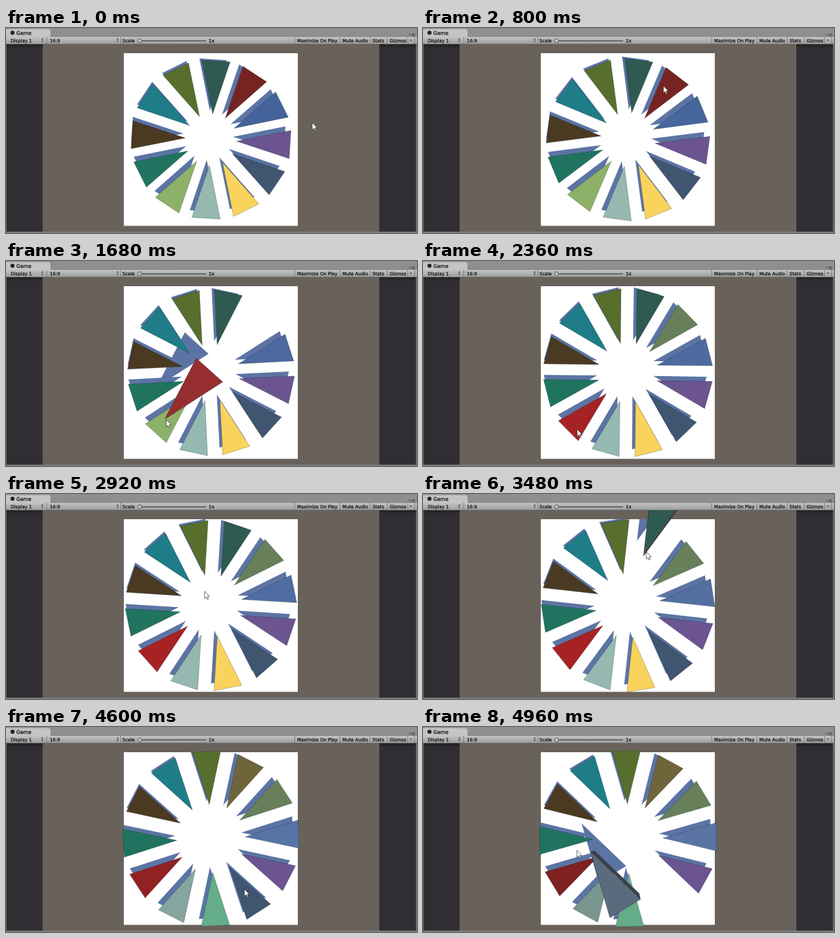
An HTML page with a canvas that plays this animation: 600 by 301 pixels, repeating every 5000 ms.

```html
<!DOCTYPE html>
<html lang="en">
<head>
<meta charset="utf-8">
<title>Color wheel</title>
<style>
html, body { margin: 0; width: 100%; height: 100%; overflow: hidden; background: #69625b; }
canvas { display: block; width: 600px; height: 301px; }
</style>
</head>
<body>
<canvas id="stage" width="600" height="301"></canvas>
<script>
const ctx = document.getElementById('stage').getContext('2d');
const LOOP = 5000;
const LIFT_TIME = 200;
const CENTER = [299.3, 163.9];
const BOARD = [172, 37, 254, 253.5];
const FLOOR_SHADOW = { scale: 0.965, dx: -4, dy: -6.5 };
const LIFT_SHADOW = { scale: 0.9, dx: -19, dy: -40 };
const UNDERSIDE = { scale: 0.9, dx: 0, dy: 0 };

// Slots clockwise, starting near the top
const COLORS = ['#2f5a51', '#762422', '#43639a', '#6b5490', '#405570', '#f9d35c',
  '#95b9b0', '#8db168', '#20745f', '#4b3a22', '#1e7d87', '#586e2d'];

const DRAGS = [
  { slot: 1, to: 7, start: 1130, end: 1900, color: '#962e30', swapped: ['#67805a', '#a62225'] },
  { slot: 0, to: 5, start: 3400, end: 4080, color: '#2f5a51', swapped: ['#70643a', '#65ac88'] },
  { slot: 4, to: 9, start: 4620, end: 5100, color: '#5b6b7e', swapped: [] }
];

// Slots whose lighting changes as the wheel turns
const FADES = [
  { slot: 2, start: 0, from: [67, 99, 154], to: [90, 116, 166] },
  { slot: 6, start: 4200, from: [149, 185, 176], to: [118, 147, 140] },
  { slot: 7, start: 4200, from: [166, 34, 37], to: [124, 33, 32] }
];

// time, x, y
const POINTER = [
  [0, 447, 139], [260, 447, 139], [760, 351, 85], [1140, 351, 85], [1620, 234, 233],
  [1690, 234, 233], [1860, 225, 247], [2420, 225, 247], [3260, 326, 85], [3490, 326, 85],
  [4040, 304, 263], [4240, 304, 263], [4540, 348, 238], [4640, 348, 238],
  [4850, 270, 188], [4960, 225, 181], [5000, 214, 180]
];

const mix = (a, b, k) => a + (b - a) * k;
const clamp = k => Math.min(1, Math.max(0, k));

function pointerAt(t) {
  let i = 1;
  while (i < POINTER.length - 1 && POINTER[i][0] < t) i++;
  const [t0, x0, y0] = POINTER[i - 1], [t1, x1, y1] = POINTER[i];
  let k = clamp((t - t0) / (t1 - t0));
  if (t < 4600) k = k * k * (3 - 2 * k);
  return [mix(x0, x1, k), mix(y0, y1, k)];
}

function wedge(apex, angle, length, half) {
  const s = Math.sin(angle), c = Math.cos(angle);
  const corner = side => [apex[0] + s * length + c * half * side, apex[1] - c * length + s * half * side];
  return [apex, corner(-1), corner(1)];
}

function project(points, { scale, dx, dy }) {
  return points.map(([x, y]) => [
    CENTER[0] + (x - CENTER[0]) * scale + dx,
    CENTER[1] + (y - CENTER[1]) * scale + dy
  ]);
}

function liftShadow(k) {
  const between = key => mix(FLOOR_SHADOW[key], LIFT_SHADOW[key], k);
  return { scale: between('scale'), dx: between('dx'), dy: between('dy') };
}

function polygon(points, fill, stroke) {
  ctx.beginPath();
  points.forEach(([x, y]) => ctx.lineTo(x, y));
  ctx.closePath();
  ctx.fillStyle = fill;
  ctx.fill();
  if (stroke) {
    ctx.strokeStyle = stroke;
    ctx.lineWidth = 0.6;
    ctx.stroke();
  }
}

// Side walls between two copies of a triangle
function walls(front, back, fill) {
  front.forEach((p, i) => {
    const j = (i + 1) % 3;
    polygon([p, front[j], back[j], back[i]], fill);
  });
}

function rect(x, y, w, h, fill) {
  ctx.fillStyle = fill;
  ctx.fillRect(x, y, w, h);
}

function shade(y0, y1, top, bottom) {
  const gradient = ctx.createLinearGradient(0, y0, 0, y1);
  gradient.addColorStop(0, top);
  gradient.addColorStop(1, bottom);
  return gradient;
}

function label(text, x, y, size = 6.64) {
  ctx.font = `${size}px "DejaVu Sans", sans-serif`;
  ctx.fillStyle = ctx.strokeStyle = '#111';
  ctx.lineWidth = 0.25;
  ctx.fillText(text, x, y);
  ctx.strokeText(text, x, y);
}

function arrows(x) {
  polygon([[x - 1.5, 17.2], [x + 1.5, 17.2], [x, 14.8]], '#444');
  polygon([[x - 1.5, 18.8], [x + 1.5, 18.8], [x, 21.2]], '#444');
}

function drawPanel() {
  rect(0, 0, 600, 13, '#8f8f8f');
  ctx.fillStyle = '#c4c4c4';
  ctx.beginPath();
  ctx.roundRect(0, 1.5, 65, 14, [0, 4, 0, 0]);
  ctx.fill();
  rect(0, 12, 600, 12, shade(12, 24, '#c6c6c6', '#9c9c9c'));
  rect(65, 12, 535, 0.8, '#777');
  rect(0, 23.2, 600, 0.8, '#666');
  ctx.fillStyle = '#222';
  ctx.beginPath();
  ctx.arc(9.5, 7, 3, 0, 7);
  ctx.fill();
  label('Game', 15, 9.7, 7.4);
  for (let y = 8; y < 12; y += 1.5) rect(592, y, 5, 0.7, '#444');
  polygon([[588, 9], [591, 9], [589.5, 11]], '#444');

  label('Display 1', 7, 20.5);
  label('16:9', 64, 20.5);
  label('Scale', 170, 20.5);
  label('1x', 296, 20.5);
  label('Maximize On Play', 425, 20.5);
  label('Mute Audio', 491, 20.5);
  label('Stats', 535, 20.5);
  label('Gizmos', 560, 20.5);
  arrows(53);
  arrows(163);
  polygon([[589.5, 17], [592.5, 17], [591, 19.5]], '#444');
  [59, 167, 421, 487, 531, 556, 586, 596].forEach(x => rect(x, 13, 0.8, 10.2, '#777'));

  rect(196, 18, 96, 1.6, '#5c5c5c');
  ctx.beginPath();
  ctx.arc(195, 18.7, 2.8, 0, 7);
  ctx.fillStyle = '#c8c8c8';
  ctx.fill();
  ctx.strokeStyle = '#444';
  ctx.lineWidth = 0.8;
  ctx.stroke();
}

function drawScene() {
  rect(0, 24, 600, 277, '#69625b');
  for (const [x, w] of [[0, 53.5], [545, 55]]) {
    rect(x, 24, w, 277, '#302e32');
    rect(x, 24, w, 6, shade(24, 30, 'rgba(0,0,0,0.3)', 'rgba(0,0,0,0)'));
  }
  rect(0, 299, 600, 2, '#7c7c7c');
  rect(0, 24, 0.7, 277, '#7c7c7c');
  rect(598.6, 24, 1.4, 277, '#7c7c7c');
  rect(...BOARD, '#fff');
}

function slotColors(t) {
  const colors = COLORS.slice();
  for (const { slot, to, end, swapped } of DRAGS) {
    if (t >= end) [colors[slot], colors[to]] = swapped;
  }
  for (const { slot, start, from, to } of FADES) {
    if (t < start) continue;
    const k = (t - start) / (LOOP - start);
    colors[slot] = `rgb(${from.map((v, i) => Math.round(mix(v, to[i], k)))})`;
  }
  return colors;
}

function drawWheel(t) {
  const drag = DRAGS.find(d => t >= d.start && t < d.end);
  const turn = (3.6 + t * 0.0051) * Math.PI / 180;
  const inner = 37.6 + t * 0.0027;
  const angleOf = i => turn + i * Math.PI / 6;
  const pieces = [];
  slotColors(t).forEach((color, i) => {
    if (drag && drag.slot === i) return;
    const a = angleOf(i);
    const apex = [CENTER[0] + Math.sin(a) * inner, CENTER[1] - Math.cos(a) * inner];
    pieces.push({ color, shape: wedge(apex, a, 78, 20.7) });
  });

  let lifted, lift;
  if (drag) {
    const [x, y] = pointerAt(t - 55);
    lift = clamp((t - drag.start) / LIFT_TIME);
    lifted = wedge([x - 2, y - 1], angleOf(drag.slot), mix(78, 97, lift), mix(20.7, 26, lift));
  }

  ctx.save();
  ctx.beginPath();
  ctx.rect(...BOARD);
  ctx.clip();
  if (lifted) polygon(project(lifted, liftShadow(lift)), '#5c74a4');
  for (const { shape } of pieces) polygon(project(shape, FLOOR_SHADOW), '#5c74a4');
  ctx.restore();

  for (const { shape, color } of pieces) polygon(shape, color, 'rgba(20,35,45,0.45)');
  if (lifted) {
    walls(lifted, project(lifted, UNDERSIDE), '#3b4148');
    polygon(lifted, drag.color, 'rgba(20,30,35,0.4)');
  }
}

function drawPointer([x, y]) {
  const outline = [[0, 0], [0, 10.5], [2.4, 8.3], [4, 12], [5.7, 11.2], [4.1, 7.7], [7.2, 7.5]];
  polygon(outline.map(([px, py]) => [x + px, y + py]), '#fff', '#111');
}

function frame(now) {
  const t = now % LOOP;
  ctx.clearRect(0, 0, 600, 301);
  drawScene();
  ctx.save();
  ctx.beginPath();
  ctx.rect(0, 24, 600, 277);
  ctx.clip();
  drawWheel(t);
  ctx.restore();
  drawPanel();
  drawPointer(pointerAt(t));
}

const began = performance.now();
function tick() {
  frame(performance.now() - began);
  requestAnimationFrame(tick);
}
tick();
</script>
</body>
</html>
```
